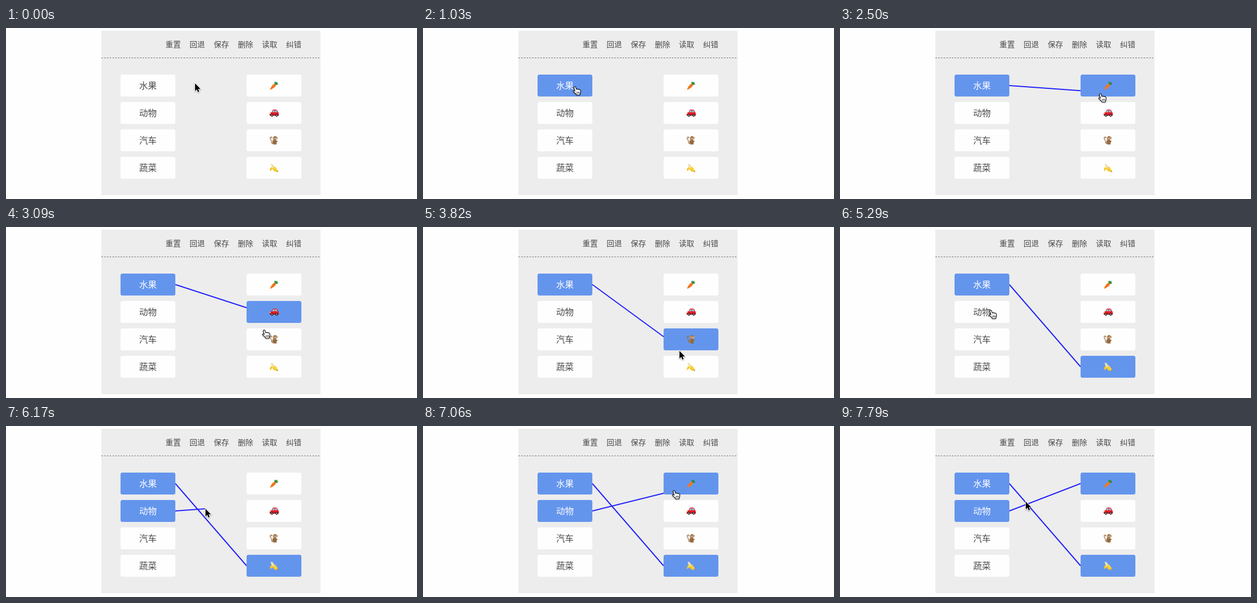
An HTML page that plays this animation: 750x312 px, repeating every 8000 ms.

```html
<!DOCTYPE html>
<html lang="zh-CN">
<head>
<meta charset="utf-8">
<title>连线题</title>
<style>
  html, body { margin: 0; width: 100%; height: 100%; overflow: hidden; background: #fefefe; }
  svg { display: block; }
  text { font-family: "Noto Sans CJK SC", "Noto Sans CJK", sans-serif; font-size: 16px; fill: #4a4a4a; text-anchor: middle; }
  #menu text { font-size: 14px; }
  .box rect { fill: #fefefe; }
  .on rect { fill: #6495ed; }
  .on text { fill: #fefefe; }
  .link { stroke: #2222fa; stroke-width: 2; }
</style>
</head>
<body>
<svg id="stage" width="750" height="312" viewBox="0 0 750 312">
  <defs>
    <g id="carrot">
      <path d="M9 5.5Q8.2 2.5 10 .4Q11.3 1 11.3 2.8Q13 .8 14.4 1.4Q14.5 3 13.2 4.2Q15.2 3.8 15.8 5Q14 7.2 10.6 6.8Z" fill="#218235"/>
      <path d="M10.3 5.8L11 2M10.8 5.6L13.8 2.6" stroke="#49a84a" stroke-width=".7"/>
      <path d="M.6 15.6C1.8 12 4.6 7 7.6 5.2C10 4 12.6 6.4 11 9C9.2 11.8 4.3 14.9 .6 15.6Z" fill="#f57a24"/>
      <path d="M6 8l2 1.2M4.2 10.5l1.6 1M8.6 6.6l1.6 1.2" stroke="#d25717" stroke-width=".7"/>
    </g>
    <g id="car">
      <path d="M0 9.6Q.2 7.4 3.6 6.8L5.6 2.8Q6.2 1.7 8 1.7H11Q13 1.8 14 3.4L15.6 6.4Q16.8 7 16.8 9V12Q16.6 13 15 13H1.2Q-.2 12.6 0 9.6Z" fill="#e81c24"/>
      <path d="M4.6 6.7L6.4 3.6Q6.8 2.9 7.8 2.9H9V6.7ZM10 2.9H11Q12.4 3 13 4L14.2 6.7H10Z" fill="#8cc6e2"/>
      <path d="M.2 10.8H16.7V12.5H.4Z" fill="#b50d18"/>
      <path d="M.4 8.3h1.8v1.4H.3z" fill="#ffe7a0"/>
      <g fill="#333" stroke="#171717" stroke-width=".5"><circle cx="4.2" cy="12.3" r="2.2"/><circle cx="13" cy="12.3" r="2.2"/></g>
      <g fill="#c9c9cc"><circle cx="4.2" cy="12.3" r="1"/><circle cx="13" cy="12.3" r="1"/></g>
    </g>
    <g id="monkey">
      <path d="M5 14C2 13 4.4 9.2 2.5 7.2C.4 5 .5 1.5 3 1.8C4.8 2.2 4.1 4.2 2.8 3.8" fill="none" stroke="#946a43" stroke-width="1.2"/>
      <path d="M5.4 8.4Q7 5 10.8 6.5L13.6 9.6L12.4 14.8Q9 16.2 5.6 15Q3.8 12 5.4 8.4Z" fill="#a5794f"/>
      <path d="M9.6 8.2L11.8 11L14.4 9M6.4 11Q10.4 10 9.4 14.8H13" fill="none" stroke="#79532f" stroke-width="1.1"/>
      <circle cx="10" cy="3.8" r="3.5" fill="#9a7048"/>
      <circle cx="6.9" cy="4" r="1.4" fill="#c79b73"/><circle cx="14" cy="3.8" r="1.3" fill="#c79b73"/>
      <ellipse cx="11" cy="4.7" rx="2.4" ry="2.3" fill="#deb88f"/>
      <path d="M10 3.8h.8M12 3.8h.8M10.3 5.9h1.8" stroke="#4b3020" stroke-width=".8"/>
    </g>
    <g id="banana">
      <path d="M2 1.8Q3.6 -.2 5.4 1.4Q7.8 4.4 10.2 8L6.2 10.6Q3 6 2 1.8Z" fill="#f3e7b5"/>
      <path d="M4 2Q5.6 5 7.8 8" fill="none" stroke="#d8c27b" stroke-width=".7"/>
      <path d="M3.5 6.5Q.7 8.2 .5 13.8Q3.2 13.5 5.5 10.4Q7.4 15.3 13.3 15.4L15.2 15.2L15 13.2Q13.8 10.4 11.5 7.4Q9.8 5 8.2 6.8L6.4 9.2Z" fill="#f8d33b"/>
      <path d="M3.4 7.6Q1.8 9.5 1.2 13.2M6.2 9.7Q8.8 13.3 13 14.4" fill="none" stroke="#e5a91e" stroke-width=".9"/>
      <path d="M13.6 14.1L15.4 13.5V15.4H13.8Z" fill="#8b6a2c"/>
    </g>
    <filter id="shade" x="-50%" y="-50%" width="200%" height="200%">
      <feDropShadow dx="0" dy="1" stdDeviation=".8" flood-opacity=".4"/>
    </filter>
  </defs>
  <rect x="174" y="5" width="400" height="300" fill="#ededed"/>
  <path d="M174 54.5H574" stroke="#777" stroke-dasharray="3 2"/>
  <g id="menu"></g>
  <g id="links"></g>
  <g id="boxes"></g>
  <g id="cursor" filter="url(#shade)">
    <path id="arrow" d="M0 0V14L3.2 11L5.4 16L7.7 15L5.6 10.2H10Z" stroke="#fff" stroke-width="1.6" paint-order="stroke"/>
    <g id="hand" transform="translate(-4 -1)" stroke="#111" stroke-width="1.1" stroke-linejoin="round">
      <path fill="#fff" d="M3.2 1.2C4.2 .4 5.2 1 5.6 2.2L6.8 6C7.4 5 9 5 9.4 6.2C10.2 5.2 11.6 5.5 12 6.6C13 6 14 6.5 14.3 7.8C14.8 10 14.6 11.5 13.6 13.2L13.2 16H7.2C6.2 13.5 3.5 12 1.5 9.8C.6 8.6 1.8 7.6 3 8.3L4.4 9.2L2.4 3Q2.2 1.8 3.2 1.2Z"/>
      <path fill="none" stroke-width=".9" d="M7.8 10.5v3.2M9.8 10.4v3.2M11.8 10.3v3.2"/>
    </g>
  </g>
</svg>
<script>
const LOOP = 8000, TICK = 147;
const LEFT = 209, RIGHT = 439, W = 100, H = 40;
const PRESS = [7, 38], DROP = [30, 50], ANSWER = [3, 0];

// Pointer path: tick, x, y
const PATH = [
  [0, 345, 101], [2, 345, 101], [3, 335, 103], [4, 305, 106], [5, 284, 108],
  [6, 277, 107], [7, 277, 107], [8, 296, 108], [9, 374, 109], [10, 442, 110],
  [11, 466, 114], [12, 474, 116], [14, 474, 116], [16, 475, 117], [17, 475, 120],
  [18, 474, 127], [19, 473, 140], [20, 472, 158], [21, 471, 188], [22, 470, 198],
  [25, 469, 222], [26, 468, 226], [27, 466, 250], [29, 466, 250], [30, 466, 252],
  [32, 466, 252], [33, 424, 231], [34, 346, 186], [35, 293, 158], [36, 275, 152],
  [38, 275, 152], [40, 292, 153], [42, 364, 151], [43, 385, 153], [45, 398, 154],
  [47, 435, 132], [48, 458, 118], [49, 470, 113], [50, 470, 113], [51, 440, 120],
  [53, 339, 138], [55, 339, 138]
];

const $ = id => document.getElementById(id);
const rowY = row => 85 + 50 * row;

function add(parent, tag, attrs, text = "") {
  const el = document.createElementNS("http://www.w3.org/2000/svg", tag);
  for (const key in attrs) el.setAttribute(key, attrs[key]);
  el.textContent = text;
  parent.append(el);
  return el;
}

function makeBox(x, row) {
  const box = add($("boxes"), "g", { class: "box" });
  add(box, "rect", { x, y: rowY(row), width: W, height: H, rx: 3.5 });
  return box;
}

["重置", "回退", "保存", "删除", "读取", "纠错"].forEach((label, i) =>
  add($("menu"), "text", { x: 305 + 44 * i, y: 35 }, label));

const left = ["水果", "动物", "汽车", "蔬菜"].map((label, row) => {
  const box = makeBox(LEFT, row);
  add(box, "text", { x: LEFT + W / 2, y: rowY(row) + 26 }, label);
  return box;
});

const right = ["carrot", "car", "monkey", "banana"].map((icon, row) => {
  const box = makeBox(RIGHT, row);
  add(box, "use", { href: "#" + icon, x: RIGHT + 42, y: rowY(row) + 12 });
  return box;
});

const links = PRESS.map((_, row) =>
  add($("links"), "line", { class: "link", x1: LEFT + W, y1: rowY(row) + H / 2 }));

function pointer(tick) {
  const k = PATH.findIndex(p => p[0] >= tick);
  const [t1, x1, y1] = PATH[k];
  if (t1 === tick) return [x1, y1];
  const [t0, x0, y0] = PATH[k - 1];
  const f = (tick - t0) / (t1 - t0);
  return [x0 + (x1 - x0) * f, y0 + (y1 - y0) * f];
}

// Row of the box under a point in the column at x0, or -1
function rowAt([x, y], x0) {
  if (x < x0 || x >= x0 + W) return -1;
  return [0, 1, 2, 3].findIndex(row => y >= rowY(row) && y < rowY(row) + H);
}

function draw(time) {
  const tick = Math.floor((time % LOOP + 7) / TICK);
  const pos = pointer(tick);
  // The dragged end trails the pointer while it slides down the right column
  const end = tick > 14 && tick < 30 ? pointer(tick - 1) : pos;
  const lit = new Set();

  links.forEach((link, i) => {
    const pressed = tick >= PRESS[i], dropped = tick >= DROP[i];
    const [x, y] = dropped ? [RIGHT, rowY(ANSWER[i]) + H / 2] : end;
    link.setAttribute("x2", x);
    link.setAttribute("y2", y);
    link.style.display = pressed ? "" : "none";
    left[i].classList.toggle("on", pressed);
    if (pressed) lit.add(dropped ? ANSWER[i] : rowAt(end, RIGHT));
  });
  right.forEach((box, row) => box.classList.toggle("on", lit.has(row)));

  const over = rowAt(pos, LEFT) >= 0 || rowAt(pos, RIGHT) >= 0;
  $("hand").style.display = over ? "" : "none";
  $("arrow").style.display = over ? "none" : "";
  $("cursor").setAttribute("transform", `translate(${pos})`);
}

const start = performance.now();
function loop() {
  draw(performance.now() - start);
  requestAnimationFrame(loop);
}
loop();
</script>
</body>
</html>
```
